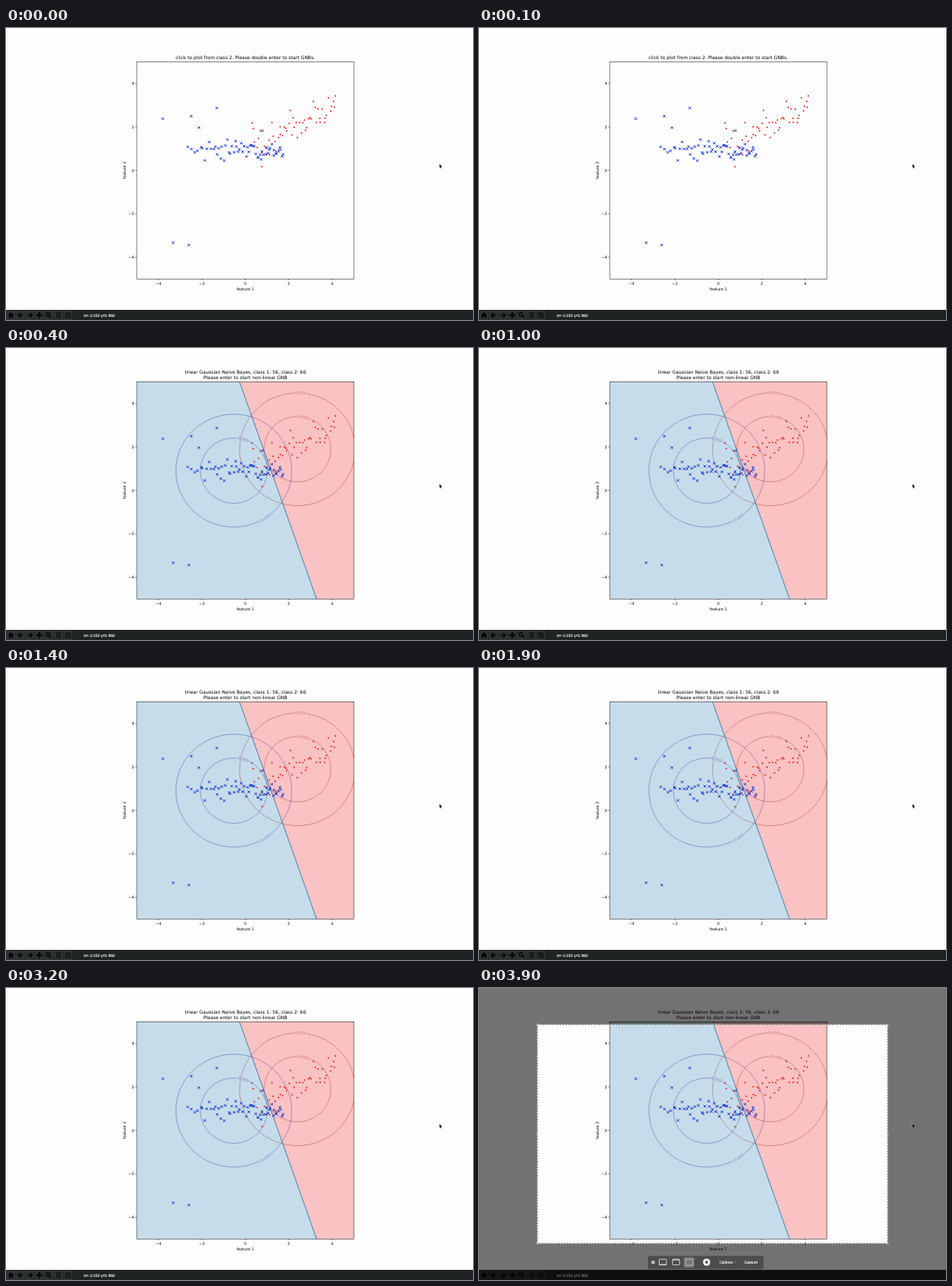
Recreate the animation shown at these times as an HTML page. Size 600 px wide and 375 px high, loop 4 s.

```html
<!DOCTYPE html>
<html lang="en">
<head>
<meta charset="utf-8">
<title>Gaussian classifier plot</title>
<style>
  html, body { margin: 0; width: 100%; height: 100%; overflow: hidden; background: #fdfdfd; }
  svg { display: block; width: 600px; height: 375px; }
  text { font: 4.95px "DejaVu Sans", sans-serif; text-anchor: middle; text-rendering: geometricPrecision; }
  .title { font-size: 5.94px; }
  .ui { font: 4.95px "Liberation Sans", Arial, sans-serif; text-anchor: start; fill: #fff; stroke: #fff; stroke-width: .15; }
</style>
</head>
<body>
<svg id="stage" viewBox="0 0 600 375"></svg>
<script>
const LOOP = 4000, FIT_AT = 200, CAPTURE_AT = 3900;
const BOX = { x: 168, y: 43.3, size: 279 };
const UNIT = BOX.size / 10;
const CENTER = { x: BOX.x + BOX.size / 2, y: BOX.y + BOX.size / 2 };
const RIGHT = BOX.x + BOX.size, BOTTOM = BOX.y + BOX.size;

let seed = 20240;
function random() {
  seed = seed * 16807 % 2147483647;
  return seed / 2147483647;
}
// Triangular noise in -1..1.
const noise = () => random() + random() - 1;
const scatter = (count, place) => Array.from({ length: count }, (_, i) => place((i + random()) / count));

const outliers = [[201.5, 116.5], [238, 113.3], [247.8, 128], [270.8, 102.7], [214.8, 275.8], [234.8, 278.7], [329.5, 131.8]];
// A flat band that gets denser to the right.
const crosses = outliers.concat(scatter(59, u => [232 + 125 * u ** .75, 156.5 + 17 * noise()]));
// A cloud that rises and narrows to the right.
const dots = scatter(56, u => {
  const x = 315 + 110 * u;
  const y = 142 - .45 * (x - 335) + (46 - .25 * (x - 335)) * noise();
  return [x, Math.min(y, 178)];
});

const text = (x, y, label, attrs = "") => `<text x="${x}" y="${y}" ${attrs}>${label}</text>`;
const title = (y, label) => text(CENTER.x, y, label, 'class="title"');
const rect = (x, y, w, h, attrs = "") => `<rect x="${x}" y="${y}" width="${w}" height="${h}" ${attrs}/>`;
const circle = (x, y, r, attrs = "") => `<circle cx="${x}" cy="${y}" r="${r}" ${attrs}/>`;
const path = (d, attrs = "") => `<path d="${d}" ${attrs}/>`;

// Ellipse with a gap at the given angle, filled by its level label.
function contour(cx, cy, rx, ry, angle, label, color) {
  const gap = 16 / rx * 180 / Math.PI, a = angle * Math.PI / 180;
  const x = cx + rx * Math.cos(a), y = cy + ry * Math.sin(a);
  const turn = angle > 0 ? angle - 90 : angle + 90;
  return `<g opacity=".45"><ellipse cx="${cx}" cy="${cy}" rx="${rx}" ry="${ry}" fill="none"
    stroke="${color}" stroke-width=".75" pathLength="360"
    stroke-dasharray="${360 - gap} ${gap}" stroke-dashoffset="${-(angle + gap / 2)}"/>
    ${text(0, 1.8, label, `fill="${color}" transform="translate(${x} ${y}) rotate(${turn})"`)}</g>`;
}

const densityContours = (cx, cy, outerAngle, innerAngle, color) =>
  contour(cx, cy, 74.4, 72.5, outerAngle, "0.005", color) +
  contour(cx, cy, 43, 42, innerAngle, "0.050", color);

function points() {
  const marks = crosses.map(([x, y]) => `M${x - 1.5} ${y - 1.5}l3 3m0-3l-3 3`).join("");
  return dots.map(([x, y]) => circle(x, y, 1, 'fill="#e02010"')).join("") +
    path(marks, 'stroke="#0828d0" stroke-width="1"');
}

function axes() {
  let ticks = "", labels = "";
  for (let v = -4; v <= 4; v += 2) {
    const x = CENTER.x + v * UNIT, y = CENTER.y - v * UNIT;
    const name = String(v).replace("-", "−");
    ticks += `M${x} ${BOTTOM}v1.8M${BOX.x} ${y}h-1.8`;
    labels += text(x, 329.7, name) + text(164.6, y + 1.8, name, 'style="text-anchor:end"');
  }
  return rect(BOX.x, BOX.y, BOX.size, BOX.size, 'fill="none" stroke="#000" stroke-width=".5"') +
    path(ticks, 'stroke="#000" stroke-width=".5"') + labels +
    text(CENTER.x, 336.5, "feature 1") +
    text(0, 0, "feature 2", 'transform="translate(154.2 182.7) rotate(-90)"');
}

function model() {
  return path(`M${BOX.x} ${BOX.y}H300L399 ${BOTTOM}H${BOX.x}z`, 'fill="#c6dcea"') +
    path(`M300 ${BOX.y}H${RIGHT}V${BOTTOM}H399z`, 'fill="#fac2c2"') +
    path(`M300 ${BOX.y}L399 ${BOTTOM}`, 'stroke="#2f75a8" stroke-width=".9"') +
    `<g clip-path="url(#plot)">` +
    densityContours(292.7, 157.5, 56, -73.5, "#12128c") +
    densityContours(374.4, 130, -87, -79, "#8c1212") + `</g>`;
}

function toolbar() {
  const line = 'fill="none" stroke="#000" stroke-width="1.3"';
  const thin = 'fill="none" stroke="#000" stroke-width=".8"';
  let buttons = "";
  for (let i = 0; i < 7; i++) buttons += rect(i * 12.2 + .4, 363, 11.6, 12, 'fill="#2f3233"');
  return rect(0, 362, 600, 13, 'fill="#202324"') + buttons +
    path("M2.5 369L6.3 365.3L10 369H9V372.5H7.2V370H5.4V372.5H3.6V369z") +
    path("M22 369H16M18.7 366L15.7 369L18.7 372M27.5 369H33.5M30.8 366L33.8 369L30.8 372", line) +
    path("M39 369H46.4M42.7 365.3V372.7", line) +
    path("M38.5 369l2-1.8v3.6zM47 369l-2-1.8v3.6zM42.7 364.8l1.8 2h-3.6zM42.7 373.2l1.8-2h-3.6z") +
    circle(54, 368, 2.3, line) + path("M55.8 369.8L58.3 372.4", line) +
    path("M64 366.3H71M64 369H71M64 371.7H71M69 365.2V367.4M66 367.9V370.1M68.5 370.6V372.8", thin) +
    path("M76.4 365.9H81.8L82.8 366.9V372.1H76.4zM77.6 366V368H81V366", thin) + circle(79.6, 370.2, .9) +
    text(100, 370.6, "x=−2.152 y=1.960", 'class="ui"');
}

function captureOverlay() {
  const line = 'fill="none" stroke="#f2f2f2" stroke-width=".8"';
  const edge = 'fill="none" stroke-width=".7"';
  let handles = "";
  for (const x of [75, 300, 525]) for (const y of [47, 187.5, 328])
    if (x !== 300 || y !== 187.5)
      handles += circle(x, y, 1.1, 'fill="#888" stroke="#fff" stroke-width=".4"');
  return path("M0 0H600V375H0zM75 47V328H525V47z", 'fill-opacity=".55"') +
    rect(75, 47, 450, 281, `${edge} stroke="#fff"`) +
    rect(75, 47, 450, 281, `${edge} stroke="#222" stroke-dasharray="1.8 1.8"`) +
    handles +
    rect(217, 344, 148.5, 17, 'rx="3" fill="#4d4d4d" stroke="#5c5c5c" stroke-width=".4"') +
    circle(223.7, 352.2, 2.3, 'fill="#d8d8d8"') +
    path("M222.8 351.3l1.8 1.8m0-1.8l-1.8 1.8", 'stroke="#4d4d4d" stroke-width=".5"') +
    rect(231.5, 348.3, 9.3, 7.3, `rx=".8" ${line}`) + path("M231.5 355H240.8", line) +
    rect(248.7, 348.3, 9, 7.3, `rx=".8" ${line}`) + path("M248.7 349.3H257.7", line) +
    rect(263.3, 345.7, 13.4, 13.4, 'rx="1.5" fill="#777"') +
    rect(265.5, 348.3, 9, 7.8, `${line} stroke-dasharray="1.3 .8"`) +
    circle(292.4, 352.1, 4.7, 'fill="#f2f2f2"') + rect(290.9, 350.6, 3, 3, 'fill="#444"') +
    text(309, 354, "Options", 'class="ui"') +
    path("M327.3 351.7l1.2 1.2l1.2-1.2", 'fill="none" stroke="#ddd" stroke-width=".5"') +
    path("M335 345V360", 'stroke="#5e5e5e" stroke-width=".4"') +
    text(340.7, 354, "Capture", 'class="ui"');
}

document.getElementById("stage").innerHTML =
  `<clipPath id="plot">${rect(BOX.x, BOX.y, BOX.size, BOX.size)}</clipPath>` +
  rect(0, 0, 600, 375, 'fill="#fdfdfd"') +
  `<g id="intro">${title(40.4, "click to plot from class 2. Please double enter to start GNBs.")}</g>` +
  `<g id="fit">${model()}` +
  title(33.4, "linear Gaussian Naive Bayes, class 1: 56, class 2: 66") +
  title(40.4, "Please enter to start non-linear GNB") + `</g>` +
  points() + axes() + toolbar() +
  `<g id="capture">${captureOverlay()}</g>` +
  path("M557 174.8V179.6L558.1 178.6L558.9 180.4L559.7 180L558.9 178.3H560.4z",
    'stroke="#fff" stroke-width=".4" paint-order="stroke"');

const show = (id, on) => document.getElementById(id).style.display = on ? "" : "none";

function render(now) {
  const t = now % LOOP;
  show("intro", t < FIT_AT);
  show("fit", t >= FIT_AT);
  show("capture", t >= CAPTURE_AT);
}

const start = performance.now();
function tick() {
  render(performance.now() - start);
  requestAnimationFrame(tick);
}
tick();
</script>
</body>
</html>
```
